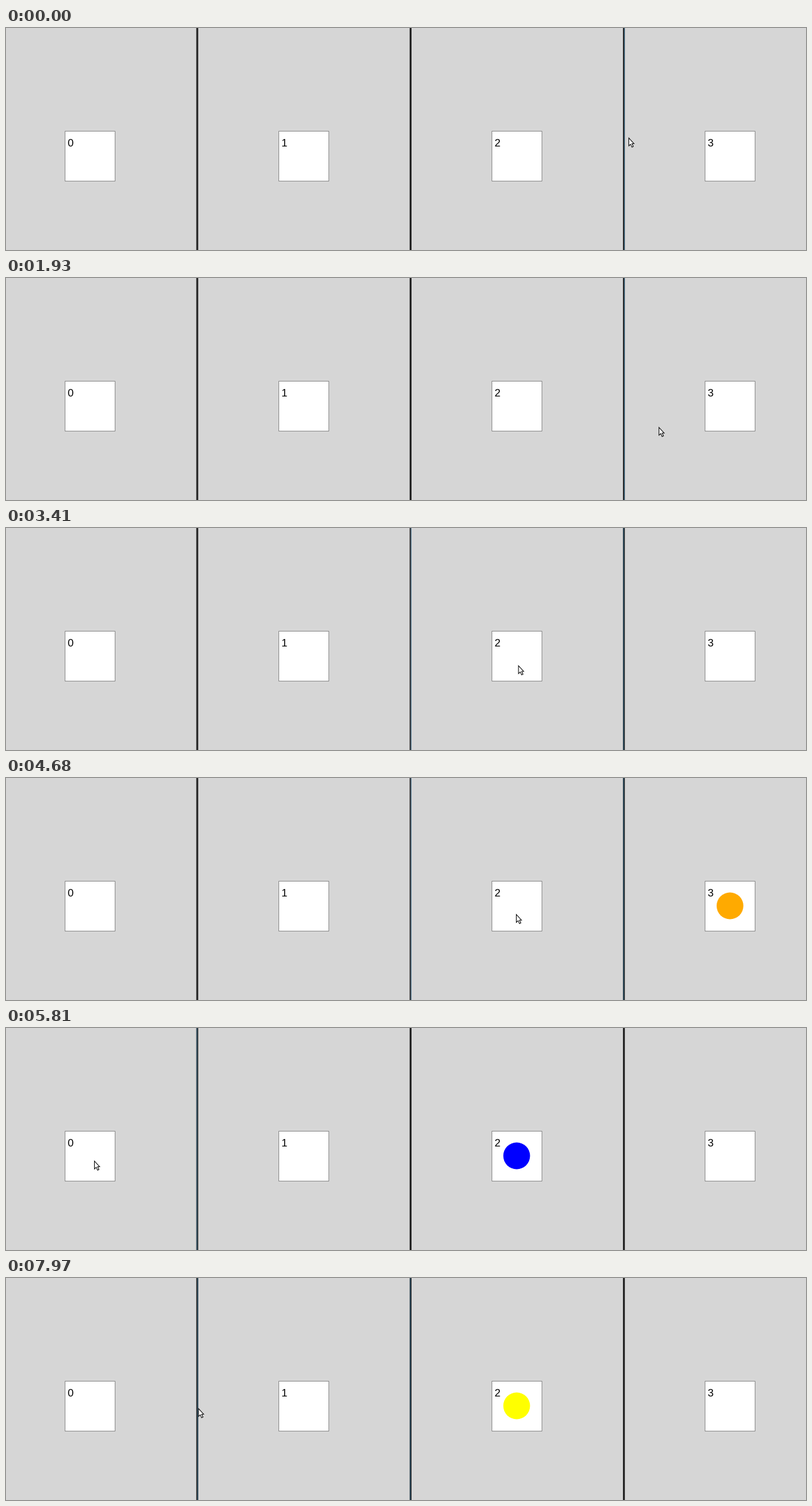
Animation, 1280 px wide and 356 px high, one loop 8 s. Source, as an HTML page:

```html
<!DOCTYPE html>
<html lang="en">
<head>
<meta charset="utf-8">
<title>Ring of four windows</title>
<style>
html, body { margin: 0; width: 100%; height: 100%; overflow: hidden; background: #d6d6d6; }
svg { display: block; width: 1280px; height: 356px; }
text { font: 17px "Liberation Sans", Arial, sans-serif; }
</style>
</head>
<body>
<svg id="stage" viewBox="0 0 1280 356"></svg>
<script>
const LOOP = 8000, PITCH = 341.33, GAP = 40;
const stage = document.getElementById('stage');
const RAINBOW = ['#ff0000', '#ffaa00', '#ffff00', '#00ff00', '#0000ff', '#4b0082', '#ee82ee'];

// Each click sends a ball around the ring: arrival times, then the time it is gone.
const trips = [
  { node: 3, times: [1220, 1590, 1960, 2330, 2700, 3080, 3450], end: 3720 },
  { node: 2, times: [4150, 4530, 4900, 5270, 5560, 5890, 6190], end: 6510 },
  { node: 0, times: [7060, 7380, 7740], end: LOOP + GAP }
];

const ease = {
  none: u => u,
  in: u => u * u,
  out: u => u * (2 - u),
  both: u => u * u * (3 - 2 * u)
};

// Pointer tip: time, x, y and the easing used to get there.
const pointerPath = [
  [0, 996.5, 176.5], [590, 996.5, 176.5], [1240, 1163, 214, 'both'],
  [1760, 1163, 214], [1940, 1032, 242.5, 'in'], [2400, 824, 226, 'out'],
  [2650, 824, 226], [2810, 820, 221, 'out'],
  [4050, 820, 221], [4230, 816.5, 219, 'out'],
  [4720, 816.5, 219], [5270, 152, 222, 'both'], [5560, 145, 222, 'out'],
  [5730, 145, 222], [5810, 141.5, 213.5, 'out'],
  [6849, 141.5, 213.5], [6850, 141.5, 212],
  [7260, 141.5, 212], [7380, 151.5, 210, 'none'],
  [7870, 151.5, 210], [7970, 308, 209.5, 'none'], [LOOP, 308, 209.5]
];

function add(tag, attrs, text) {
  const el = document.createElementNS('http://www.w3.org/2000/svg', tag);
  for (const key in attrs) el.setAttribute(key, attrs[key]);
  if (text !== undefined) el.textContent = text;
  return stage.appendChild(el);
}

add('rect', { width: 1280, height: 356, fill: '#d6d6d6' });

const dividers = [0, 1, 2].map(i => {
  const x = 304.5 + i * PITCH;
  const strip = (dx, width, fill) => add('rect', { x: x + dx, y: 0, width, height: 356, fill });
  strip(0, 3, '#202020');
  return { left: strip(0.6, 1, '#2f617f'), right: strip(1.8, 1, '#2f617f') };
});
dividers[1].right.setAttribute('fill', '#86b4d0');

for (let i = 0; i < 4; i++) {
  const x = Math.floor(94.8 + i * PITCH) + 0.5;
  add('rect', { x, y: 165.5, width: 80, height: 80, fill: '#fff', stroke: '#8c8c8c' });
  add('text', { x: x + 4.3, y: 189.5 }, i);
}

const ball = add('circle', { cy: 205, r: 21.4 });
const pointer = add('path', {
  d: 'M0 0V12.4L2.9 9.8L5 14.6L7.2 13.6L5.1 9H8.3Z',
  fill: '#fff', stroke: '#111', 'stroke-width': 1.1
});

function ballAt(t) {
  for (const { node, times, end } of trips) {
    if (t < times[0] || t >= end) continue;
    const hop = times.filter(start => start <= t).length - 1;
    const leaves = hop + 1 < times.length ? times[hop + 1] - GAP : end;
    return t < leaves ? { node: (node + hop) % 4, color: RAINBOW[hop] } : null;
  }
  return null;
}

function pointerAt(t) {
  const next = Math.max(1, pointerPath.findIndex(key => key[0] > t));
  const [t0, x0, y0] = pointerPath[next - 1];
  const [t1, x1, y1, kind = 'none'] = pointerPath[next];
  const u = ease[kind]((t - t0) / (t1 - t0));
  return [x0 + (x1 - x0) * u, y0 + (y1 - y0) * u];
}

function show(el, visible) {
  el.setAttribute('visibility', visible ? 'visible' : 'hidden');
}

function render(t) {
  const [x, y] = pointerAt(t);
  pointer.setAttribute('transform', `translate(${x} ${y})`);

  const focused = Math.floor((x + 35.3) / PITCH);
  dividers.forEach(({ left, right }, i) => {
    show(left, focused === i);
    show(right, focused === i + 1);
  });

  const state = ballAt(t);
  show(ball, state);
  if (state) {
    ball.setAttribute('cx', 134.4 + state.node * PITCH);
    ball.setAttribute('fill', state.color);
  }
}

const began = performance.now();
function tick() {
  render((performance.now() - began) % LOOP);
  requestAnimationFrame(tick);
}
tick();
</script>
</body>
</html>
```
